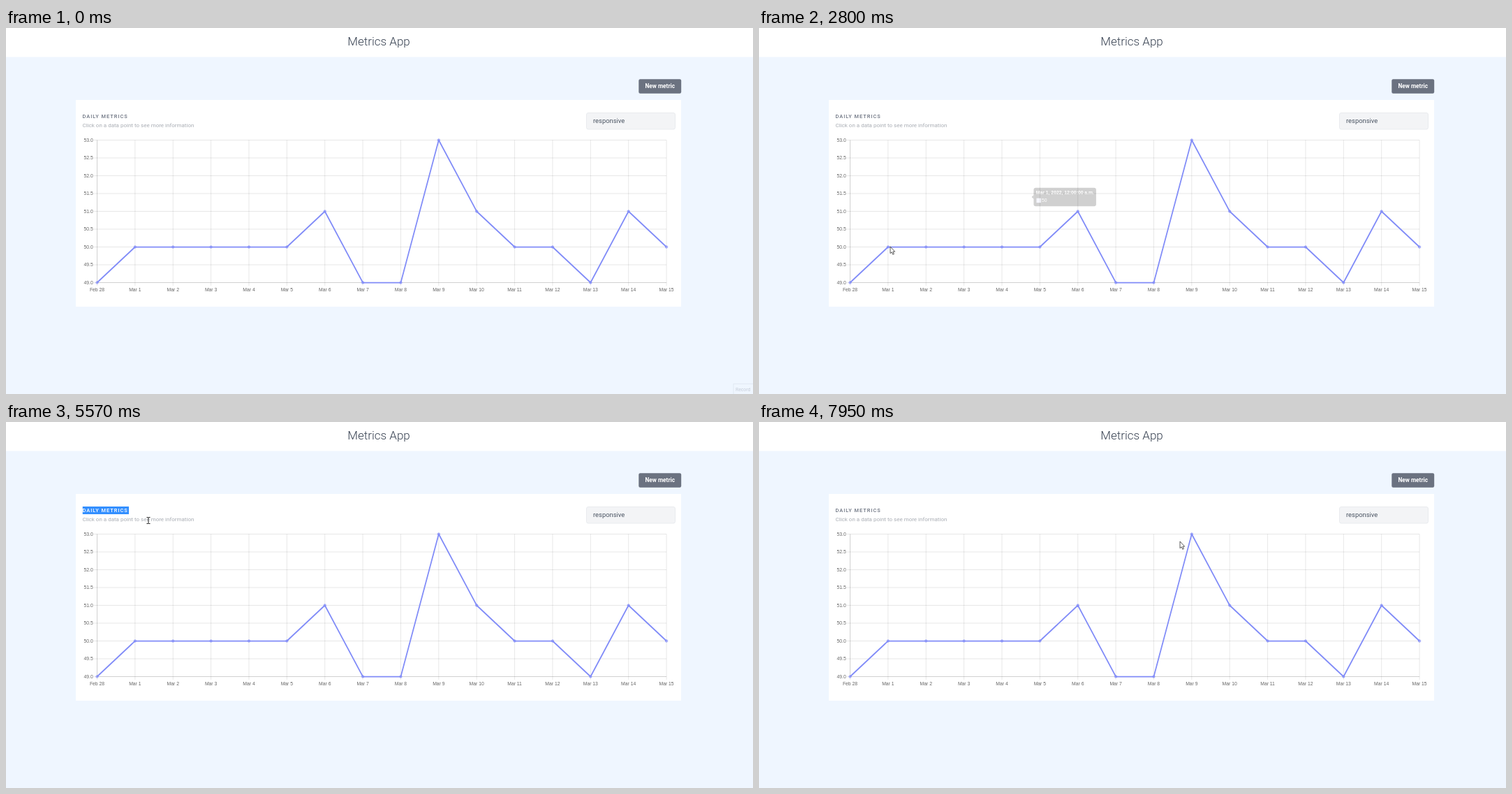
Write an HTML page that moves like this. It is 1070 px wide and 524 px high and loops after 8 s.

```html
<!DOCTYPE html>
<html lang="en">
<head>
<meta charset="utf-8">
<title>Metrics</title>
<style>
  html, body { margin: 0; width: 100%; height: 100%; overflow: hidden; background: #eff6ff; }
  svg { display: block; }
  text { font-family: Roboto, sans-serif; }
  .axis text, #tip text { font-family: "Liberation Sans", Arial, sans-serif; font-size: 6.8px; }
  .axis text { fill: #666; }
  .axis path { fill: none; stroke: #000; stroke-opacity: .12; stroke-width: .8; }
  .heading { font-size: 7.4px; font-weight: 500; letter-spacing: 1px; }
  .dot { fill: #818cf8; fill-opacity: .5; stroke: #818cf8; stroke-width: .7; }
</style>
</head>
<body>
<svg width="1070" height="524" viewBox="0 0 1070 524">
  <rect width="1070" height="524" fill="#eff6ff"/>
  <rect width="1070" height="41.5" fill="#fff"/>
  <text x="534" y="25" text-anchor="middle" font-size="17" font-weight="300" fill="#374151">Metrics App</text>

  <rect x="906.3" y="73.3" width="60.9" height="20.5" rx="2.2" fill="#6b7280"/>
  <text x="936.7" y="86.2" text-anchor="middle" font-size="8.3" font-weight="700" fill="#fff">New metric</text>

  <rect x="100" y="103" width="867" height="296" fill="#fff"/>
  <text class="heading" x="109.5" y="129" fill="#6b7280">DAILY METRICS</text>
  <text x="109.5" y="142" font-size="8" fill="#a9adb4">Click on a data point to see more information</text>
  <svg id="selection" x="109.5" y="121" width="0" height="11">
    <rect width="67" height="11" fill="#338fff"/>
    <text class="heading" y="8" fill="#fff">DAILY METRICS</text>
  </svg>
  <rect x="831.5" y="121.5" width="127" height="23.5" rx="2.5" fill="#f3f4f6" stroke="#e5e7eb" stroke-width=".8"/>
  <text x="841" y="136.2" font-size="9.4" fill="#4b5563">responsive</text>

  <g id="axes" class="axis"></g>
  <g id="series"></g>
  <circle id="hover" class="dot" r="2.5"/>

  <g id="tip">
    <g fill="#000" fill-opacity=".8">
      <rect width="89.5" height="26.5" rx="3"/>
      <path id="caret"/>
    </g>
    <text id="tipTitle" x="3.4" y="9" font-weight="700" fill="#fff"></text>
    <rect x="4" y="15" width="6.5" height="6.5" fill="#dcdffb"/>
    <text id="tipValue" x="11.6" y="20.8" fill="#fff"></text>
  </g>

  <g id="recorder">
    <rect x="1042" y="509.5" width="30" height="16" fill="none" stroke="#dfe6f0" stroke-width=".8"/>
    <text x="1045" y="519.6" font-size="6.8" fill="#c6cdd8">Record</text>
  </g>

  <g id="cursor">
    <path id="arrow" d="M0 0V9.7L2.2 7.8L3.8 11.3L5.4 10.5L3.9 7.2H6.7Z" fill="#fff" stroke="#333" stroke-width=".8"/>
    <path id="beam" d="M-2.5-4.5H-.7L0-4L.7-4.5H2.5M0-4V4M-2.5 4.5H-.7L0 4L.7 4.5H2.5" fill="none" stroke="#222"/>
  </g>
</svg>
<script>
const DURATION = 8000;
const values = [49, 50, 50, 50, 50, 50, 51, 49, 49, 53, 51, 50, 50, 49, 51, 50];
const el = id => document.getElementById(id);
const clamp = v => Math.max(0, Math.min(1, v));
const lerp = (a, b, k) => a + (b - a) * k;
const smooth = k => k * k * (3 - 2 * k);
const easeOutQuart = k => 1 - (1 - clamp(k)) ** 4;
const px = day => 130.5 + day * 54.37;
const py = v => 364.5 - (v - 49) * 51;

function set(id, attributes) {
  for (const name in attributes) el(id).setAttribute(name, attributes[name]);
}

function buildChart() {
  let axes = '<path d="M130.5 160.5V364.5H946"/>';
  for (let v = 49; v <= 53; v += .5) {
    axes += `<path d="M126 ${py(v)}H946"/><text x="124.8" y="${py(v) + 2}" text-anchor="end">${v.toFixed(1)}</text>`;
  }
  let points = '', dots = '';
  values.forEach((v, day) => {
    const x = px(day), y = py(v);
    axes += `<path d="M${x} 160.5V369"/><text x="${x}" y="376.7" text-anchor="middle">${day ? 'Mar ' + day : 'Feb 28'}</text>`;
    points += `${x},${y} `;
    dots += `<circle class="dot" cx="${x}" cy="${y}" r="1.7"/>`;
  });
  el('axes').innerHTML = axes;
  el('series').innerHTML = `<polyline points="${points}" fill="none" stroke="#818cf8" stroke-width="1.75" stroke-linejoin="round"/>${dots}`;
}

// Pointer gestures: each one runs from where the last ended, optionally bent towards a control point
const entry = [1016, 489];
const gestures = [
  { start: 520, end: 1280, to: [618, 161] },
  { start: 1440, end: 2110, to: [143, 237], bend: [25, 130] },
  { start: 2180, end: 2740, to: [188, 313], bend: [160, 358] },
  { start: 2800, end: 2870, to: [190, 313] },
  { start: 3580, end: 4560, to: [99, 119], bend: [290, 65] },
  { start: 4700, end: 4760, to: [91, 115] },
  { start: 4960, end: 5090, to: [167, 141] },
  { start: 5300, end: 5570, to: [204, 141] },
  { start: 5570, end: 6400, to: [457, 263], bend: [400, 215] },
  { start: 7600, end: 7950, to: [603, 171] }
];

function pointerAt(t) {
  let from = entry;
  for (const { start, end, to, bend } of gestures) {
    if (t < start) break;
    const k = smooth(clamp((t - start) / (end - start)));
    const origin = from;
    from = origin.map((a, i) => {
      const c = bend ? bend[i] : (a + to[i]) / 2;
      return lerp(lerp(a, c, k), lerp(c, to[i], k), k);
    });
  }
  return from;
}

// The tooltip glides from the previously hovered day to the new one
const hovers = [
  { day: 9, previous: 9, show: 1240, hide: 1480 },
  { day: 1, previous: 9, show: 2742, hide: 2790 },
  { day: 6, previous: 1, show: 6406, hide: 7590 }
];
const isPeak = day => values[day] === 53;
const tipPlace = day => isPeak(day)
  ? [px(day) - 44.75, py(values[day]) + 4.3]
  : [px(day) + 5.2, py(values[day]) - 13.3];

function drawTooltip(t) {
  const h = hovers.find(h => t >= h.show && t < h.hide + 200);
  set('tip', { opacity: 0 });
  set('hover', { opacity: h && t < h.hide ? 1 : 0 });
  if (!h) return;
  const fadeIn = clamp((Math.min(t, h.hide) - h.show) / 200);
  const fadeOut = clamp((t - h.hide) / 200);
  const k = easeOutQuart((t - h.show) / 400);
  const from = tipPlace(h.previous), to = tipPlace(h.day);
  set('tip', {
    opacity: fadeIn * (1 - fadeOut),
    transform: `translate(${lerp(from[0], to[0], k)} ${lerp(from[1], to[1], k)})`
  });
  set('caret', { d: isPeak(h.day) ? 'M42 0L44.8-2.8L47.6 0Z' : 'M0 10.4L-2.8 13.2L0 16Z' });
  set('hover', { cx: px(h.day), cy: py(values[h.day]) });
  el('tipTitle').textContent = `Mar ${h.day}, 2022, 12:00:00 a.m.`;
  el('tipValue').textContent = values[h.day];
}

function draw(t) {
  const [x, y] = pointerAt(t);
  const overText = x > 109 && x < 270 && y > 121 && y < 146;
  set('cursor', { transform: `translate(${x} ${y})`, opacity: t < 520 ? 0 : 1 });
  set('arrow', { opacity: overText ? 0 : 1 });
  set('beam', { opacity: overText ? 1 : 0 });
  set('recorder', { opacity: t < 70 ? 1 : 0 });
  const dragged = t < 5300 ? clamp((x - 109.5) / 66.5) : 1;
  set('selection', { width: t > 4960 && t < 5820 ? 66.5 * dragged : 0 });
  drawTooltip(t);
}

buildChart();
const start = performance.now();
function tick() {
  draw((performance.now() - start) % DURATION);
  requestAnimationFrame(tick);
}
tick();
</script>
</body>
</html>
```
